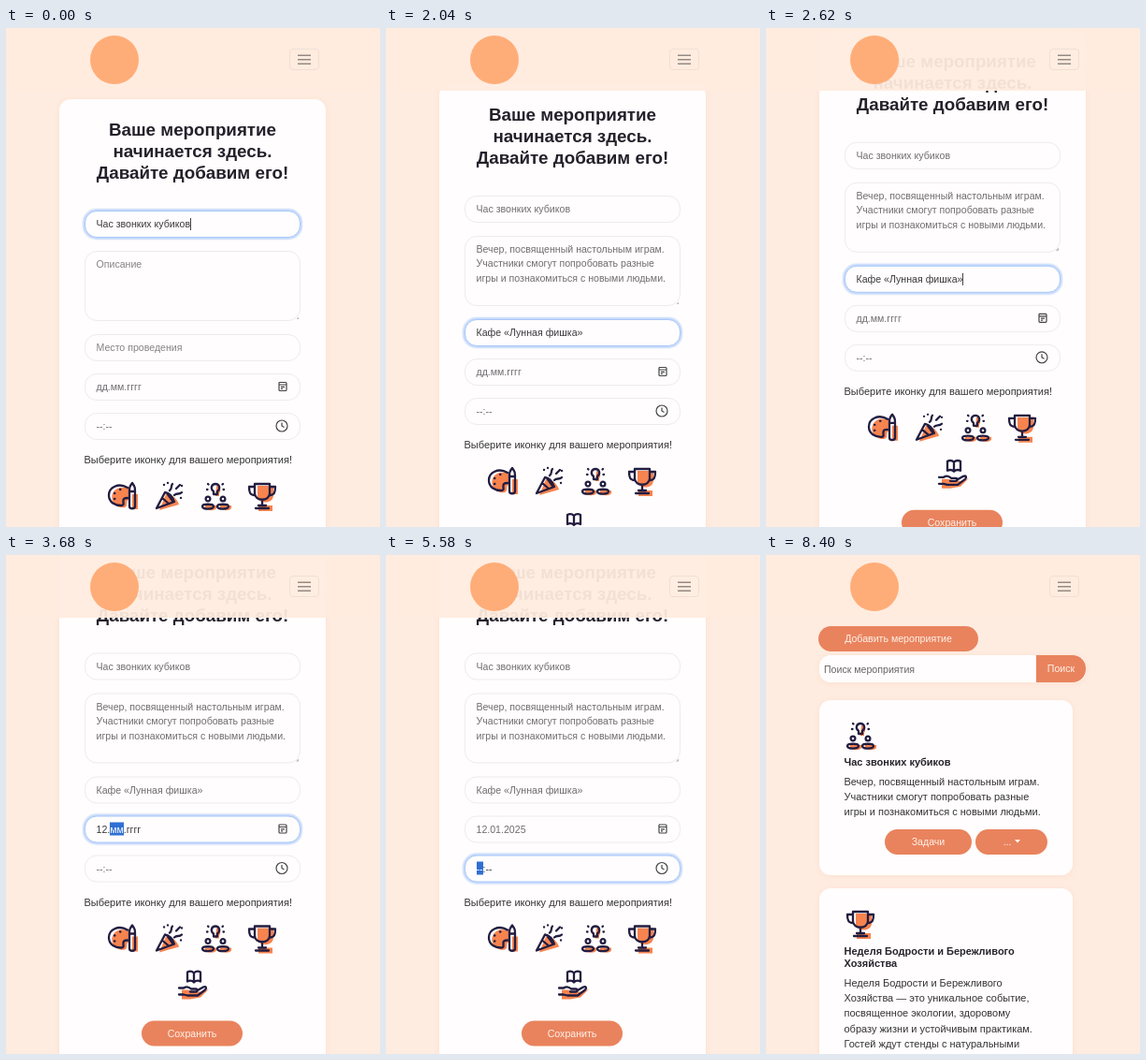
These frames come from a looping animation (400x533 px, 8420 ms). An HTML page:

```html
<!DOCTYPE html>
<html lang="ru">
<meta charset="utf-8">
<style>
html, body { margin: 0; width: 100%; height: 100%; overflow: hidden; background: #ffece0; }
body { position: relative; font: 11px/16.4px "Liberation Sans", Arial, sans-serif; color: #333; }
div, svg { position: absolute; box-sizing: border-box; white-space: pre; }
#form, #list, header { position: absolute; left: 0; top: 0; width: 400px; }
header { height: 67px; background: rgba(255, 236, 224, .94); }
.logo { left: 90px; top: 8px; width: 52px; height: 52px; border-radius: 50%; background: #ffad78; }
.menu { left: 303px; top: 22px; width: 32px; height: 23px; border: 1px solid #f0dfd4; border-radius: 4px; }
.menu svg { left: 8px; top: 4px; stroke: #958a84; stroke-width: 1.6; }
.card { background: #fffdfd; border-radius: 12px; box-shadow: 0 1px 7px rgba(190, 120, 80, .09); }
h1 { position: absolute; margin: 0; left: 57px; top: 97px; width: 285px; text-align: center;
  font-size: 18.8px; line-height: 23px; color: #24212b; white-space: pre; }
.field { left: 83px; width: 232px; padding: 0 12px; border: 1px solid #eeebee; border-radius: 13px;
  font-size: 10.6px; line-height: 27px; color: #6f6d70; background: #fffdfd; }
.area { padding-top: 6px; line-height: 15.6px; }
.area::after { content: ""; position: absolute; right: 1px; bottom: 1px; width: 3px; height: 3px;
  background: linear-gradient(135deg, transparent 50%, #bbb 50%); }
.focus { color: #3a3a3e; border-color: #a9c7f8; box-shadow: 0 0 1.5px 2px #c6dafb; }
.caret { display: inline-block; width: 1px; height: 13px; margin-right: -1px; vertical-align: -3px; background: #444; }
mark { background: #2f6fd4; color: #fff; padding: 1px 0; }
.btn { background: #e9835d; color: #fff2ea; border-radius: 14px; height: 27px; line-height: 27px;
  text-align: center; font-size: 10.6px; }
.title { font-weight: bold; line-height: 13.6px; color: #26232c; }
.icon { width: 32px; height: 32px; overflow: visible; }
.icon path { fill: #f7834f; }
.icon path + path { fill: none; stroke: #221d40; stroke-width: 2.3; stroke-linecap: round; stroke-linejoin: round; }
.glyph { fill: none; stroke: #444; stroke-width: 1.2; width: 14px; height: 14px; }
</style>
<body>
<div id="form"></div>
<div id="list"></div>
<header>
  <div class="logo"></div>
  <div class="menu"><svg width="14" height="14"><path d="M0 2.2h14M0 6.7h14M0 11.2h14"/></svg></div>
</header>
<script>
const LOOP = 8420, LIST_AT = 7630;
const EVENT = 'Час звонких кубиков', PLACE = 'Кафе «Лунная фишка»';
const ABOUT = 'Вечер, посвященный настольным играм.\nУчастники смогут попробовать разные\nигры и познакомиться с новыми людьми.';

// Each icon: orange backing, then dark outline
const ICONS = {
  palette: ['M22 8C9 3 2 13 5 21s14 9 15 5-1-6 4-6zM26 14h6v16h-6z',
    'M21 7C11 1 1 7 1 15s7 11 13 11c5 0 1-4 3-7 1-1 2-1 4-1M7 13h.4M13 9h.4M7 19h.4M26 2c-3 4-3 5-3 9h6c0-4 0-5-3-9zM23 11v16c0 3 6 3 6 0V11'],
  popper: ['M12 14L5 31l21-6c-2-6-7-11-14-11z',
    'M11 12L2 29l19-7c-2-6-5-9-10-10zM8 18l7 6M14 14l5 7M16 10c3-2 1-5 3-7M21 15c3-3 5 0 8-3M23 8l4-4M10 4h.1M28 18h.1M14 2h.1M29 5h.1'],
  team: ['M17 5c5 1 5 6 3 8v3h-4zM5 26h12v3c-2 3-9 3-12 0zM21 26h12v3c-2 3-9 3-12 0z',
    'M14 11c-4-3-2-8 2-8s6 5 2 8v3h-4zM8 3l.5.5M24 3l-.5.5M7 9h.5M25 9h-.5M5.6 19a2.4 2.4 0 1 0 4.8 0 2.4 2.4 0 1 0-4.8 0M21.6 19a2.4 2.4 0 1 0 4.8 0 2.4 2.4 0 1 0-4.8 0M2 27c0-3 12-3 12 0s-12 4-12 0zM18 27c0-3 12-3 12 0s-12 4-12 0z'],
  cup: ['M11 5h17v10c0 9-13 10-17 3zM12 26h15v6H12z',
    'M8 3h16v10c0 9-16 9-16 0zM8 6H2c0 6 1 9 6 9M24 6h6c0 6-1 9-6 9M16 20v6M9 29h14M12 26h8'],
  hand: ['M4 22h7l6 2h10l6-3-9 9-11 2H4z',
    'M17 4c-2-2-5-2-7-1v10c2-1 5-1 7 1 2-2 5-2 7-1V3c-2-1-5-1-7 1v10M1 20h5c3-2 6-1 8 1h5c2 0 2 3 0 3h-6M20 23l7-4c3-1 4 1 2 3l-8 6H10l-4-1H1'],
};

const box = (cls, x, y, w, h, text = '') =>
  `<div class="${cls}" style="left:${x}px;top:${y}px;width:${w}px;height:${h}px">${text}</div>`;
const label = (x, y, text, cls = '') => `<div class="${cls}" style="left:${x}px;top:${y}px">${text}</div>`;
const icon = (name, x, y) => `<svg class="icon" viewBox="0 0 32 32" style="left:${x - 16}px;top:${y - 16}px">` +
  ICONS[name].map(d => `<path d="${d}"/>`).join('') + '</svg>';
const glyph = (y, d) => `<svg class="glyph" style="left:288px;top:${y - 7}px"><path d="${d}"/></svg>`;

const form = document.getElementById('form'), list = document.getElementById('list');

form.innerHTML = box('card', 57, 76, 285, 620) +
  '<h1>Ваше мероприятие\nначинается здесь.\nДавайте добавим его!</h1>' +
  [194.5, 237.5, 326.5, 368.5, 410.5].map((y, i) => box('field', 83.5, y, 231.5, i == 1 ? 75 : 29)).join('') +
  glyph(383, 'M4 2.5h7q1 0 1 1v7q0 1-1 1H5q-1 0-1-1v-8M4 5h8M6 7.3h4M6 9.4h2') +
  glyph(425, 'M1 7a6 6 0 1 0 12 0a6 6 0 1 0-12 0M7 3.5V7l2.5 1.5') +
  label(83.5, 453, 'Выберите иконку для вашего мероприятия!') +
  icon('palette', 125, 500) + icon('popper', 175, 500) + icon('team', 224, 500) +
  icon('cup', 274, 500) + icon('hand', 199.5, 549) +
  box('btn', 145, 588, 108, 27, 'Сохранить');

list.innerHTML = box('btn', 56, 76, 171, 27, 'Добавить мероприятие') +
  box('card', 57, 107, 285, 29) + label(62, 113.5, '<span style="font-size:10.6px;color:#666">Поиск мероприятия</span>') +
  '<div class="btn" style="left:289px;top:107px;width:53px;height:29px;line-height:29px;border-radius:0 14px 14px 0">Поиск</div>' +
  box('card', 57, 155, 271, 186.5) + icon('team', 101, 193) +
  label(83.5, 215, EVENT, 'title') + label(83.5, 233.5, ABOUT) +
  box('btn', 127, 293, 93, 27, 'Задачи') + box('btn', 224, 293, 77, 27, '...   <svg width="7" height="4" style="left:42px;top:11px"><path d="M0 0h6L3 3.5z" fill="#fff2ea"/></svg>') +
  box('card', 57, 356, 271, 250) + icon('cup', 101, 394) +
  label(83.5, 416.5, 'Неделя Бодрости и Бережливого\nХозяйства', 'title') +
  label(83.5, 448.5, 'Неделя Бодрости и Бережливого\nХозяйства — это уникальное событие,\nпосвященное экологии, здоровому\nобразу жизни и устойчивым практикам.\nГостей ждут стенды с натуральными');

const fields = [...form.querySelectorAll('.field')];
const FOCUS_AT = [0, 220, 1200, 3000, 5250];
// [time, value, selected part]
const DATE = [[0, 'дд.мм.гггг'], [3000, 'дд.мм.гггг', 0], [3320, '01.мм.гггг', 0], [3500, '12.мм.гггг', 1],
  [4100, '12.01.гггг', 2], [4500, '12.01.0002', 2], [4640, '12.01.0020', 2], [4780, '12.01.0202', 2],
  [4920, '12.01.2025', 2], [5250, '12.01.2025']];
const TIME = [[0, '--:--'], [5250, '--:--', 0], [5950, '01:--', 0], [6150, '19:--', 1], [6500, '19:00', 1]];

const ramp = (t, a, b) => Math.min(1, Math.max(0, (t - a) / (b - a)));
const easeOut = p => 1 - (1 - p) ** 2;
const typed = (text, t, a, b) => text.slice(0, Math.floor(text.length * ramp(t, a, b)));

function parts(steps, t) {
  const [, value, sel] = steps.findLast(s => t >= s[0]);
  return value.split(/([.:])/).map((p, i) => i === sel * 2 ? `<mark>${p}</mark>` : p).join('');
}

function draw(t) {
  const onList = t >= LIST_AT;
  form.style.display = onList ? 'none' : '';
  list.style.display = onList ? '' : 'none';
  if (onList) return;
  const scroll = 16 * easeOut(ramp(t, 1200, 1360)) + 74.5 * easeOut(ramp(t, 2450, 2780));
  form.style.transform = `translateY(${-scroll}px)`;

  const focus = FOCUS_AT.findLastIndex(s => t >= s);
  const caret = Math.floor(t / 180) % 2 ? '' : '<span class="caret"></span>';
  const values = [EVENT, typed(ABOUT, t, 260, 1150), typed(PLACE, t, 1280, 1950), parts(DATE, t), parts(TIME, t)];
  const hints = ['', 'Описание', 'Место проведения'];
  fields.forEach((el, i) => {
    const active = i == focus;
    el.className = 'field' + (i == 1 ? ' area' : '') + (active ? ' focus' : '');
    const hint = values[i] ? '' : `<span style="color:#858385">${hints[i]}</span>`;
    const cursor = active && i < 3 ? caret : '';
    const html = values[i] + cursor + hint;
    if (el.shown != html) el.innerHTML = el.shown = html;
  });
}

const start = performance.now();
(function tick() {
  draw((performance.now() - start) % LOOP);
  requestAnimationFrame(tick);
})();
</script>
</body>
</html>
```
